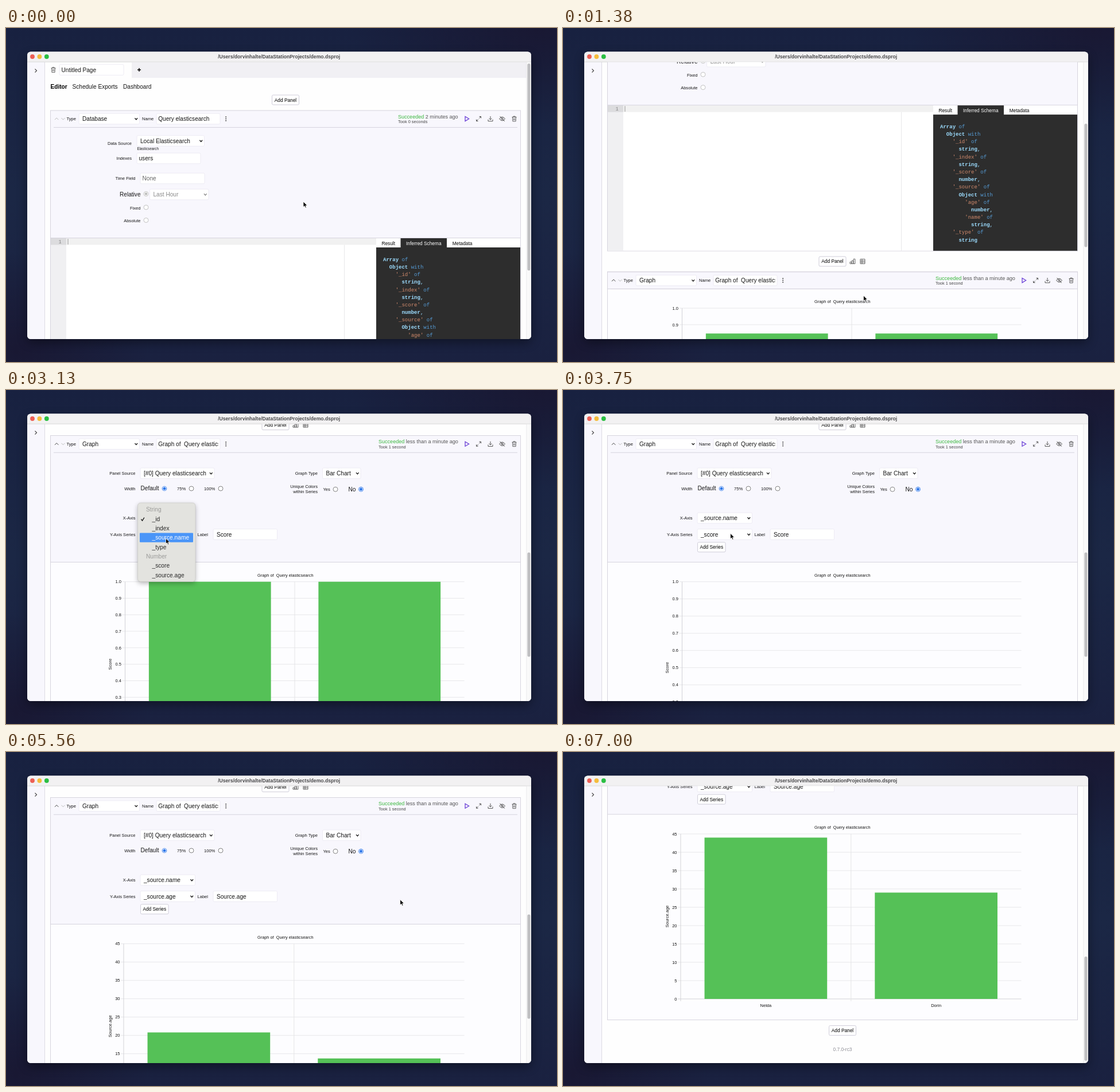
Recreate the animation shown at these times as an HTML page. Size 960 px wide and 583 px high, loop 7060 ms.

```html
<!DOCTYPE html>
<html lang="en">
<head>
<meta charset="utf-8">
<title>Query and graph demo</title>
<style>
  html, body { margin: 0; width: 100%; height: 100%; overflow: hidden; background: #1a2541; }
  svg { display: block; }
  #stage { width: 100%; height: 100%; }
  text { font-family: "Liberation Sans", Arial, sans-serif; white-space: pre; }
  .mono { font-family: "Liberation Mono", "Courier New", monospace; }
</style>
</head>
<body>
<svg id="stage" viewBox="0 0 960 583">
  <defs>
    <linearGradient id="sky" x1="0" y1="0" x2="0" y2="1">
      <stop offset="0" stop-color="#182140"/><stop offset=".5" stop-color="#1b2745"/><stop offset="1" stop-color="#1a2140"/>
    </linearGradient>
    <radialGradient id="dusk">
      <stop offset="0" stop-color="#191833"/><stop offset="1" stop-color="#191833" stop-opacity="0"/>
    </radialGradient>
    <filter id="soft" x="-20%" y="-20%" width="140%" height="140%"><feGaussianBlur stdDeviation="9"/></filter>
    <filter id="near" x="-20%" y="-20%" width="140%" height="140%"><feGaussianBlur stdDeviation="4"/></filter>
    <clipPath id="frame"><rect x="37" y="41.5" width="878" height="501.5" rx="6"/></clipPath>
    <clipPath id="view"><rect x="68" y="59.5" width="839" height="483.5"/></clipPath>
  </defs>
  <rect width="960" height="583" fill="url(#sky)"/>
  <ellipse cx="930" cy="0" rx="330" ry="170" fill="url(#dusk)"/>
  <ellipse cx="20" cy="560" rx="230" ry="170" fill="url(#dusk)"/>
  <rect x="37" y="48" width="878" height="501" rx="8" fill="#000" opacity=".4" filter="url(#soft)"/>
  <g clip-path="url(#frame)">
    <g id="chrome"></g>
    <g clip-path="url(#view)"><g id="page"></g></g>
    <g id="bar"></g>
  </g>
  <g id="menus"></g>
  <g id="pointer"></g>
</svg>
<script>
const LOOP = 7060;
const INK = '#161616', LINE = '#d6d4de', PALE = '#f8f7fd', GREEN = '#55c157';
const BODY = 10.1, SMALL = 7.55, BTN = 8.33;
const $ = id => document.getElementById(id);

// Markup helpers; text is placed by the middle of its capitals.
const rect = (x, y, w, h, fill, extra = '') =>
  `<rect x="${x}" y="${y}" width="${w}" height="${h}" fill="${fill}" ${extra}/>`;
const path = (d, stroke, width = 1, extra = '') =>
  `<path d="${d}" fill="none" stroke="${stroke}" stroke-width="${width}" ${extra}/>`;
const text = (x, y, s, size = BODY, fill = INK, extra = '') =>
  `<text x="${x}" y="${(y + size * .36).toFixed(2)}" font-size="${size}" fill="${fill}" ${extra}>${s}</text>`;
const END = 'text-anchor="end"', MID = 'text-anchor="middle"', BOLD = 'font-weight="bold"';
const label = (right, y, s) => text(right, y, s, SMALL, INK, END);
const group = (id, body, extra = '') => `<g id="${id}" ${extra}>${body}</g>`;
const at = (x, y, body) => `<g transform="translate(${x} ${y})">${body}</g>`;

const input = (x, y, w, s, fill = INK, pad = 6) =>
  rect(x, y - 9.3, w, 18.6, '#fff', 'rx="2" stroke="#eae8f1" stroke-width=".8"') +
  `<svg x="${x}" y="${y - 9}" width="${w - 3}" height="18" overflow="hidden">${text(pad, 9, s, BODY, fill)}</svg>`;
const select = (x, y, w, s, fill = INK, id = '') =>
  rect(x, y - 9.3, w, 18.6, '#fff', 'rx="2" stroke="#eae8f1" stroke-width=".8"') +
  text(x + 6, y, s, BODY, fill, id && `id="${id}"`) +
  path(`M${x + w - 8} ${y - 1.2}l2.3 2.6 2.3-2.6`, fill, 1.3);
const button = (cx, y, w, s) =>
  rect(cx - w / 2, y - 8.5, w, 17, '#fff', 'rx="2" stroke="#cfcdd9"') + text(cx, y, s, BTN, '#000', MID);
const radio = (x, y, on, stroke = '#777') => on
  ? `<circle cx="${x}" cy="${y}" r="4.3" fill="#2f78ea"/><circle cx="${x}" cy="${y}" r="3.4" fill="#fff"/><circle cx="${x}" cy="${y}" r="2.5" fill="#2f78ea"/>`
  : `<circle cx="${x}" cy="${y}" r="4" fill="#fff" stroke="${stroke}" stroke-width=".9"/>`;

const trash = (x, y) => at(x, y, path('M-4-3h8M-1.6-3v-1.4h3.2V-3M-3-3l.4 7.4h5.2L3-3M-1-1v3.5M1-1v3.5', '#555', .9));
const tools = y =>
  at(803, y, path('M-3-4L3.6 0-3 4z', '#6a3fd6', 1.3)) +
  at(823.5, y, path('M1 -4h3v3M4-4L.8-.8M-1 4h-3v-3M-4 4l3.2-3.2', '#555', 1)) +
  at(844, y, path('M0-4.5v6M-2.4-.8L0 1.7 2.4-.8M-4 1.2v3h8v-3', '#555', 1)) +
  at(864.5, y, path('M-5 0Q0-6.5 5 0Q0 6.5-5 0zM-4-4.4L4.2 4.4', '#555', 1) + '<circle r="1.6" fill="none" stroke="#555"/>') +
  trash(885.5, y);

function header(y, type, name, x, when, took, first) {
  const dots = [-3.2, 0, 3.2].map(d => `<circle cx="383.2" cy="${y + d}" r="1" fill="#444"/>`).join('');
  return path(`M85 ${y + 1.6}l3.2-3.2 3.2 3.2`, first ? '#bbb' : '#444') + path(`M96.5 ${y - 1.4}l3 3 3-3`, '#bbb') +
    text(105.5, y, 'Type', SMALL) + select(127, y, 105.5, type) +
    text(237, y, 'Name', SMALL) + input(262, y, 111, name, INK, 3.2) + dots +
    text(x, y - 4, `<tspan fill="#3cb83f">Succeeded</tspan> ${when}`, 9.05, '#555') +
    text(x, y + 5, took, 7.4, '#444') + tools(y) + path(`M83 ${y + 15}H891`, LINE);
}

// Each row: indent, word, colour class, trailing keyword or comma.
const schema = [
  [0, 'Array', 'of'], [2, 'Object', 'with'], [4, "'_id'", 'of'], [6, 'string', ','],
  [4, "'_index'", 'of'], [6, 'string', ','], [4, "'_score'", 'of'], [6, 'number', ','],
  [4, "'_source'", 'of'], [6, 'Object', 'with'], [8, "'age'", 'of'], [10, 'number', ','],
  [8, "'name'", 'of'], [10, 'string', ','], [4, "'_type'", 'of'], [6, 'string', '']
];
const schemaText = schema.map(([pad, word, tail], i) => {
  const quoted = word[0] === "'";
  const rest = tail === ',' ? ',' : `<tspan fill="#569cd6" font-weight="normal">${tail && ' ' + tail}</tspan>`;
  return text(657 + pad * 5.41, 403.6 + i * 13.17,
    `<tspan ${quoted ? 'fill="#d18a6c" font-weight="normal"' : BOLD}>${word}</tspan>${rest}`, 9.02, '#9cdcfe', 'class="mono"');
}).join('');

const queryPanel =
  rect(77.5, 144, 819, 477, PALE, `stroke="${LINE}"`) +
  header(158.5, 'Database', 'Query elasticsearch', 683, '2 minutes ago', 'Took 0 seconds', true) +
  label(219, 201, 'Data Source') + select(228, 197, 117.5, 'Local Elasticsearch') + text(228.5, 210.5, 'Elasticsearch', 6.3) +
  label(219, 227.5, 'Indexes') + input(228, 227.5, 111, 'users', INK, 3.5) +
  label(225.5, 262.5, 'Time Field') + input(234, 262.5, 112, 'None', '#666', 3.5) +
  text(234.5, 290, 'Relative', BODY, INK, END) + radio(244, 289.5, false, '#bbb') +
  '<circle cx="244" cy="289.5" r="2.3" fill="#bbb"/>' + select(250.5, 290.5, 102.5, 'Last Hour', '#8a8a8a') +
  label(234.5, 314, 'Fixed') + radio(244, 313, false, '#bbb') +
  label(234.5, 336.5, 'Absolute') + radio(244, 335.5, false, '#bbb') +
  rect(78, 367, 567, 253.5, '#fff') + rect(78, 367, 27, 253.5, '#f0f0f2') +
  rect(78, 367, 27, 11.5, '#dcdcde') + rect(105, 367, 540, 11.5, '#f1f1f1') +
  path('M589.5 378.5V620.5', '#e8e8ea') + path('M108 368V378', '#999') + path('M78 366.5H896', LINE) +
  text(94, 373, '1', 8.6, '#888', 'text-anchor="middle" class="mono"') +
  rect(645, 367, 251, 17, '#fff') + rect(687.5, 367, 80.5, 17, '#2d2d2d') + rect(645, 383, 251, 237.7, '#2d2d2d') +
  text(666.2, 375.5, 'Result', BTN, '#000', MID) + text(727.8, 375.5, 'Inferred Schema', BTN, '#fff', MID) +
  text(795, 375.5, 'Metadata', BTN, '#000', MID) + schemaText +
  button(469.5, 639.3, 47, 'Add Panel') +
  at(504.5, 639.3, path('M-4.5 4v-3h2.8v3zM-1.5 4v-5.3h2.8V4zM1.6 4v-8.2h2.8V4z', '#555', .9)) +
  at(522, 639.3, path('M-4-4h8v8h-8zM-4-1h8M-1-4v8M-4 1.5h8', '#555', .9));

// Chart in the coordinates of the expanded graph panel.
const TOP = 334.7, RIGHT = 798.5;
function chart(id, { x0, height, ticks, step, digits, axis, names }) {
  const w = (RIGHT - x0) / 2, bottom = TOP + height;
  let s = '';
  for (let i = 0; i <= ticks; i++) {
    const y = bottom - i * height / ticks;
    s += path(`M${x0 - 5} ${y}H${RIGHT}`, i ? '#e6e6e8' : '#cfcfd2', .9) +
      text(x0 - 6.5, y, (i * step).toFixed(digits), 7.5, INK, END);
  }
  s += path(`M${x0} ${TOP}V${bottom + 4}`, '#cfcfd2', .9);
  if (names) {
    s += path(`M${x0 + w} ${TOP}V${bottom + 4}`, '#e2e2e4', .9);
    names.forEach((name, i) => {
      const mid = x0 + w * (i + .5);
      s += `<rect class="col" x="${mid - w * .36}" width="${w * .72}" y="${bottom}" height="0" fill="${GREEN}"/>` +
        text(mid, bottom + 11.5, name, 7.5, INK, MID);
    });
  }
  const cy = TOP + height / 2;
  s += text(181.5, cy, axis, 7.55, INK, `${MID} transform="rotate(-90 181.5 ${cy})"`);
  return group(id, s);
}
const unit = { x0: 207.5, ticks: 10, step: .1, digits: 1 };
const idSpec = { ...unit, height: 288, axis: 'Score', names: ['kQ3xZn4BvT8mLw2cRy7e', 'lg3xZn4BvT8mLw2cYy6d'] };
const bareSpec = { ...unit, height: 300, axis: 'Score' };
const waitSpec = { ...bareSpec, axis: 'Source.age' };
const ageSpec = { x0: 205, height: 288, ticks: 9, step: 5, digits: 0, axis: 'Source.age', names: ['Nelda', 'Dorin'] };

const settings =
  label(225.5, 145.3, 'Panel Source') + select(234, 145.3, 129, '[#0] Query elasticsearch') +
  label(543, 145.3, 'Graph Type') + select(551.5, 145.3, 66.5, 'Bar Chart') +
  label(225.5, 172, 'Width') + text(234.5, 171.5, 'Default') + radio(276, 172, true) +
  text(298, 172, '75%', SMALL) + radio(323, 172) + text(345, 172, '100%', SMALL) + radio(374, 172) +
  label(543, 168.7, 'Unique Colors') + label(543, 177.3, 'within Series') +
  text(552.5, 173, 'Yes', SMALL) + radio(574, 173.3) + text(596.5, 173, 'No') + radio(618.5, 173.3, true) +
  label(225.5, 223.7, 'X-Axis') + select(234, 223.5, 95.5, '_id', INK, 'xField') +
  label(225.5, 252, 'Y-Axis Series') + select(234, 252, 95.5, '_score', INK, 'yField') +
  text(333.5, 252, 'Label', SMALL) + rect(361, 242.7, 111.5, 18.6, '#fff', 'rx="2" stroke="#eae8f1" stroke-width=".8"') +
  text(367, 252, 'Score', BODY, INK, 'id="yLabel"') + button(258.8, 274.3, 48.5, 'Add Series');

const BASE = 578.2, FOLD = 192;
const graphPanel = at(0, BASE,
  group('shift1', rect(77.5, 271, 819, 388.3, '#fdfdff', `stroke="${LINE}"`)) +
  rect(77.5, 79.5, 819, 29.5, PALE, `stroke="${LINE}"`) +
  group('settings', rect(77.5, 79.5, 819, 221, PALE, `stroke="${LINE}"`) + settings) +
  rect(378, 87.5, 10.5, 13, '#e9e7f0', 'id="hover" rx="2"') +
  header(94.2, 'Graph', 'Graph of  Query elasticsearch', 649, 'less than a minute ago', 'Took 1 second', false) +
  group('shift2', text(486.8, 323.5, 'Graph of  Query elasticsearch', 7.35, INK, MID) +
    chart('byId', idSpec) + chart('bare', bareSpec) + chart('wait', waitSpec) + chart('byAge', ageSpec)));

$('page').innerHTML =
  rect(219, 59.5, 688, 27.5, '#f1f0f4') + trash(82.5, 73) + input(93, 73, 112, 'Untitled Page', INK, 3.5) +
  path('M229 73h6M232 70v6', '#000', 1.5) +
  text(77.5, 102, 'Editor', BODY, '#000', BOLD) + text(115.5, 102, 'Schedule Exports') + text(204, 102, 'Dashboard') +
  button(487, 125.5, 47, 'Add Panel') + queryPanel + group('graph', graphPanel) +
  group('foot', group('lastAdd', button(487, 18.5, 47, 'Add Panel')) + text(487, 51, '0.7.0-rc3', BTN, '#8d8d95', MID));

$('chrome').innerHTML =
  rect(37, 41, 878, 503, '#fefefe') + rect(37, 59, 30.5, 485, PALE) + path('M67.5 59V543', '#dddbe4') +
  path('M50.5 71.5l3 3-3 3', '#444', 1.1) +
  rect(37, 41, 878, 18.5, '#f2f1f2') + path('M37 59.2H915', '#d4d3d5', .8) +
  ['#ed5f55', '#f5bd3c', '#2bbf43'].map((c, i) => `<circle cx="${46 + i * 12.4}" cy="50" r="3.9" fill="${c}"/>`).join('') +
  text(475.7, 50, '/Users/dorvinhalte/DataStationProjects/demo.dsproj', 8.6, '#4a4a4c', `${MID} ${BOLD}`);

$('bar').innerHTML = rect(907, 59.8, 8, 484, '#fafafa') + path('M906.8 59.8V543', '#e6e6e8', .8) +
  rect(908.4, 62, 5.2, 100, '#bfbfc1', 'id="thumb" rx="2.6"');

// Pop-up lists
const ROW = 16.33;
const strings = ['#String', '_id', '_index', '_source.name', '_type'], numbers = ['#Number', '_score', '_source.age'];
const lists = [
  { top: 197, open: 2600, close: 3250, items: [...strings, ...numbers] },
  { top: 225.3, open: 3900, close: 4440, items: [...numbers, ...strings] }
];
$('menus').innerHTML = lists.map((m, i) => group('menu' + i,
  rect(229.5, m.top + 3, 100.5, 137.5, '#000', 'rx="5" opacity=".28" filter="url(#near)"') +
  rect(229.5, m.top, 100.5, 137.5, '#e3e3df', 'rx="5" stroke="#c4c4c2" stroke-width=".6"') +
  rect(233, 0, 93, ROW, '#4a95f8', `id="pick${i}" rx="1"`) +
  path(`M235.5 ${m.top + 28.5}l2 2.6 3.4-5.4`, INK, 1.3) +
  m.items.map((s, n) => s[0] === '#'
    ? text(244, m.top + 11.6 + n * ROW, s.slice(1), 10.2, '#9b9b99')
    : text(254.5, m.top + 11.6 + n * ROW, s, 10.2, '#2a2a2a', `id="item${i}_${n}"`)).join(''))).join('');

$('pointer').innerHTML =
  group('arrow', '<path d="M0 0V9.6L2.2 7.6 3.7 11 5.3 10.3 3.9 7H6.9z" fill="#000" stroke="#fff" stroke-width=".8"/>') +
  group('hand', '<path d="M-.9 5V.6Q0-.8.9.6V3.4Q2-.0 0 3.4Q2 2.6 2.5 3.8Q3.8 3.2 4.2 4.6V7.2L3.2 10H-1.7L-4 6.6Q-4 4.9-2.4 5.8L-.9 7z" fill="#000" stroke="#fff" stroke-width=".8"/>');

// Motion tables
const scrollKeys = [[60, 0], [200, 70], [340, 130], [480, 153.5], [1280, 153.5], [1380, 230.7], [1560, 440],
  [1660, 540], [1760, BASE], [5650, BASE], [5780, 660], [5900, 740], [6050, 769.9]];
const pointKeys = [[150, 518, 303], [700, 505, 478], [950, 505, 478], [1250, 523.5, 467], [1700, 523.5, 467],
  [2050, 383.5, 97], [2200, 383.5, 97], [2550, 290, 222], [2650, 290, 222], [2950, 278.5, 259], [3300, 278.5, 259],
  [3800, 292, 250], [4000, 292, 250], [4250, 286.7, 271.5], [4650, 286.7, 271.5], [5050, 803, 95], [5250, 803, 95],
  [5560, 686.7, 257.5]];

const linear = p => p, smooth = p => p * p * (3 - 2 * p);
function track(keys, t, col, ease) {
  const i = keys.findIndex(k => k[0] > t);
  if (i < 0) return keys[keys.length - 1][col];
  if (i === 0) return keys[0][col];
  const a = keys[i - 1], b = keys[i];
  return a[col] + (b[col] - a[col]) * ease((t - a[0]) / (b[0] - a[0]));
}
const show = (id, on) => $(id).setAttribute('display', on ? 'inline' : 'none');
const move = (id, x, y) => $(id).setAttribute('transform', `translate(${x.toFixed(2)} ${y.toFixed(2)})`);

function grow(id, spec, values, t, start) {
  const p = Math.min(1, Math.max(0, (t - start) / 1000));
  const k = 1 - (1 - p) ** 4, max = spec.ticks * spec.step;
  document.querySelectorAll(`#${id} .col`).forEach((bar, i) => {
    const h = values[i] / max * spec.height * k;
    bar.setAttribute('y', TOP + spec.height - h);
    bar.setAttribute('height', h);
  });
}

function draw(t) {
  const added = t >= 900, open = t >= 2085, named = t >= 3400, aged = t >= 4600, loaded = t >= 5413;
  const scroll = track(scrollKeys, t, 1, linear);
  const x = track(pointKeys, t, 1, smooth), y = track(pointKeys, t, 2, smooth);

  move('page', 0, -scroll);
  const end = !added ? 621 : BASE + 659.3 - (open ? 0 : FOLD);
  const total = end + 15.5;
  move('foot', 0, end);
  show('lastAdd', added);
  $('thumb').setAttribute('y', 62 + scroll / total * 480);
  $('thumb').setAttribute('height', 480 * 483 / total - 3);

  show('graph', added);
  show('settings', open);
  move('shift1', 0, open ? 0 : -FOLD);
  $('shift1').firstChild.setAttribute('height', 388.3);
  move('shift2', 0, open ? 0 : -FOLD);
  show('byId', !named);
  show('bare', named && !aged);
  show('wait', aged && !loaded);
  show('byAge', loaded);
  grow('byId', idSpec, [1, 1], t, open ? 2090 : 1007);
  grow('byAge', ageSpec, [44, 29], t, 5413);
  $('xField').textContent = named ? '_source.name' : '_id';
  $('yField').textContent = aged ? '_source.age' : '_score';
  $('yLabel').textContent = aged ? 'Source.age' : 'Score';

  lists.forEach((m, i) => {
    const fade = Math.max(0, (t - m.close) / 160);
    const seen = t >= m.open && fade < 1;
    show('menu' + i, seen);
    if (!seen) return;
    $('menu' + i).setAttribute('opacity', 1 - fade * fade);
    const row = Math.floor((y - m.top - 4) / ROW);
    const live = !!$(`item${i}_${row}`);
    show('pick' + i, live);
    $('pick' + i).setAttribute('y', m.top + 3.5 + row * ROW);
    m.items.forEach((_, n) => {
      const item = $(`item${i}_${n}`);
      if (item) item.setAttribute('fill', n === row ? '#fff' : '#2a2a2a');
    });
  });

  const overDots = t > 2030 && t < 2230, overPlay = t > 5030 && t < 5270;
  show('hover', overDots);
  show('pointer', t < 6060);
  show('hand', overDots || overPlay);
  show('arrow', !(overDots || overPlay));
  move('pointer', x, y);
}

const born = performance.now();
function tick() {
  draw((performance.now() - born) % LOOP);
  requestAnimationFrame(tick);
}
tick();
</script>
</body>
</html>
```
